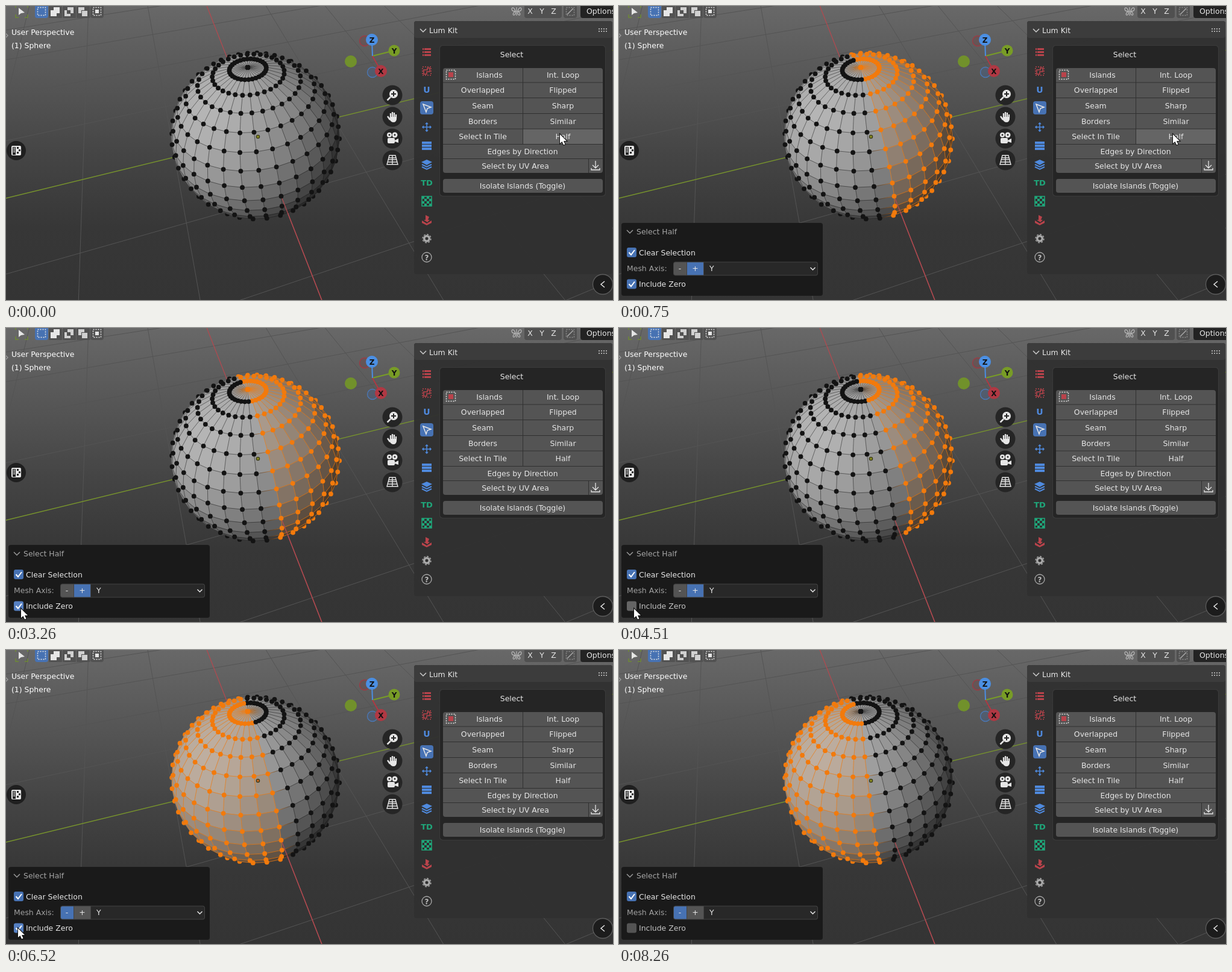
Recreate the animation shown at these times as an HTML page with a canvas. Size 1007x488 px, loop 8780 ms.

```html
<!DOCTYPE html>
<html lang="en">
<head>
<meta charset="utf-8">
<title>Select Half</title>
<style>
html, body { margin: 0; width: 100%; height: 100%; overflow: hidden; background: #3a3a3a; }
canvas { display: block; }
</style>
</head>
<body>
<canvas id="stage" width="1007" height="488"></canvas>
<script>
const g = document.getElementById('stage').getContext('2d');
const LOOP = 8780;
const WHITE = '#e6e6e6', BLUE = '#4772b3', GREY = '#545454', ORANGE = '#f27a0c';
const RED_ICON = '#b9434b', BLUE_ICON = '#4f8ade', GREEN_ICON = '#1fa67a';

// start time, cursor x, cursor y, side (0 = nothing selected yet), include zero
const steps = [
  [0, 919, 213, 0, 1], [500, 919, 213, 1, 1],
  [1000, 800, 262, 1, 1], [1250, 400, 390, 1, 1], [1500, 60, 464, 1, 1],
  [1750, 25, 466, 1, 1], [2000, 25, 466, 1, 0], [3260, 25, 466, 1, 1],
  [4010, 25, 466, 1, 0], [4760, 62, 450, 1, 0],
  [5010, 92, 439, -1, 0], [6020, 54, 452, -1, 0], [6270, 20, 462, -1, 0],
  [6520, 20, 462, -1, 1], [7270, 20, 462, -1, 0],
  [7770, 420, 360, -1, 0], [8010, 960, 300, -1, 0], [8260, -99, 0, -1, 0]
];

// ---- drawing helpers ----
function box(x, y, w, h, color, r = 0) {
  g.fillStyle = color;
  g.beginPath();
  g.roundRect(x, y, w, h, r);
  g.fill();
}
function disc(x, y, r, color, ring) {
  g.beginPath();
  g.arc(x, y, r, 0, 7);
  if (color) { g.fillStyle = color; g.fill(); }
  if (ring) { g.strokeStyle = ring; g.lineWidth = 1.3; g.stroke(); }
}
function text(s, x, y, color = WHITE, align = 'left', size = 12.45, weight = '') {
  g.font = `${weight} ${size}px "DejaVu Sans", sans-serif`;
  g.textAlign = align;
  g.fillStyle = color;
  g.fillText(s, x, y);
}
function shape(x, y, d, fill, stroke, w = 1.5) {
  const p = new Path2D(d);
  g.save();
  g.translate(x, y);
  if (stroke) { g.strokeStyle = stroke; g.lineWidth = w; g.stroke(p); }
  if (fill) { g.fillStyle = fill; g.fill(p); }
  g.restore();
}
function line(a, b, color, w = 1) {
  g.strokeStyle = color;
  g.lineWidth = w;
  g.beginPath();
  g.moveTo(a.x, a.y);
  g.lineTo(b.x, b.y);
  g.stroke();
}
function dashed(x, y, size, color) {
  g.setLineDash([2, 2]);
  g.strokeStyle = color;
  g.lineWidth = 1.5;
  g.strokeRect(x - size / 2, y - size / 2, size, size);
  g.setLineDash([]);
}

// ---- perspective camera ----
const FOCAL = 700, DEPTH = 5.18, OX = -0.792, OY = -0.244;
const RAD = Math.PI / 180, PITCH = 45.5 * RAD, TURN = 20.45 * RAD;
const PS = Math.sin(PITCH), PC = Math.cos(PITCH), TS = Math.sin(TURN), TC = Math.cos(TURN);

function project(x, y, z) {
  const right = x * TS + y * TC, near = x * TC - y * TS;
  const down = PS * near - PC * z, front = PC * near + PS * z;
  const k = FOCAL / (DEPTH - front);
  return {
    x: 525 + k * (OX + right), y: 250 + k * (OY + down),
    right, down, front, side: y,
    facing: DEPTH * front - OX * right - OY * down - 1
  };
}

const SEGS = 32, RINGS = 16;
const verts = [];
for (let j = 0; j <= RINGS; j++) {
  const t = j * Math.PI / RINGS, row = [];
  for (let i = 0; i < SEGS; i++) {
    const a = i * 2 * Math.PI / SEGS;
    row.push(project(Math.sin(t) * Math.cos(a), Math.sin(t) * Math.sin(a), Math.cos(t)));
  }
  verts.push(row);
}
const vert = (j, i) => verts[j][i % SEGS];

function drawFloor() {
  const bg = g.createLinearGradient(0, 0, 0, 488);
  bg.addColorStop(0, '#686868');
  bg.addColorStop(0.5, '#454545');
  bg.addColorStop(0.75, '#373737');
  bg.addColorStop(1, '#343434');
  g.fillStyle = bg;
  g.fillRect(0, 0, 1007, 488);
  for (let k = -4; k <= 3; k++) {
    if (!k) continue;
    line(project(k, -6, 0), project(k, 20, 0), '#545454');
    line(project(-20, k, 0), project(4, k, 0), '#545454');
  }
  line(project(-20, 0, 0), project(4, 0, 0), '#b04a50', 1.3);
  line(project(0, -6, 0), project(0, 20, 0), '#78952c', 1.3);
}

function drawSphere(sign, zero) {
  const picked = v => {
    const s = sign * v.side;
    return sign !== 0 && (Math.abs(v.side) < 1e-6 ? zero : s > 0);
  };
  const point = v => disc(v.x, v.y, 3.9, picked(v) ? ORANGE : '#131313');
  const all = verts.flat();
  all.filter(v => v.facing <= 0 && v.facing > -0.7).forEach(point);

  for (let j = 0; j < RINGS; j++) for (let i = 0; i < SEGS; i++) {
    const q = [vert(j, i), vert(j, i + 1), vert(j + 1, i + 1), vert(j + 1, i)];
    const mean = key => q.reduce((sum, v) => sum + v[key], 0) / 4;
    if (mean('facing') < -0.1) continue;
    const light = -0.42 * mean('right') - 0.25 * mean('down') + 0.87 * mean('front');
    const v = 42 + 140 * Math.max(0, (light + 0.3) / 1.3) ** 1.15;
    const mix = q.every(picked) ? 0.13 : 0;
    const rgb = [250, 130, 20].map(c => v + (c - v) * mix);
    g.fillStyle = g.strokeStyle = `rgb(${rgb})`;
    g.lineWidth = 0.7;
    g.beginPath();
    q.forEach(p => g.lineTo(p.x, p.y));
    g.closePath();
    g.fill();
    g.stroke();
  }

  const tint = v => picked(v) ? 'rgba(242,125,16,.8)' : 'rgba(25,25,25,.55)';
  const edge = (a, b) => {
    if (a.facing < -0.2 || b.facing < -0.2) return;
    let color = tint(a);
    if (picked(a) !== picked(b)) {
      color = g.createLinearGradient(a.x, a.y, b.x, b.y);
      color.addColorStop(0, tint(a));
      color.addColorStop(1, tint(b));
    }
    line(a, b, color, 0.9);
  };
  for (let j = 0; j < RINGS; j++) for (let i = 0; i < SEGS; i++) {
    edge(vert(j, i), vert(j + 1, i));
    if (j) edge(vert(j, i), vert(j, i + 1));
  }
  line(project(1, 0, 0), project(4, 0, 0), '#b04a50', 1.3);
  all.filter(v => v.facing > 0).forEach(point);
  disc(418, 217, 2.6, sign < 0 && zero ? '#c8671e' : '#8a8c22', '#3a3a1a');
}

// ---- interface ----
function drawHeader() {
  shape(0, 0, 'M16 3V0M16 14V19H21M31 19H36V14M36 3V0', null, '#6f8a35');
  shape(21, 3, 'M0 0V12L4 9 10 8Z', WHITE);
  for (let i = 0; i < 5; i++) {
    const x = 48 + i * 23;
    box(x, -5, 22, 25, i ? '#525252' : BLUE, i === 0 || i === 4 ? 4 : 1);
    if (i === 0 || i === 4) dashed(x + 11, 9, 13, WHITE);
  }
  shape(74, 2, 'M5 0H15V10H10V15H0V5H5Z', WHITE);
  shape(97, 2, 'M5 0H15V10H10V5H5ZM0 5H4V11H10V15H0Z', '#d0d0d0');
  shape(120, 2, 'M0 0H10V5H5V10H0ZM6 6H15V15H6Z', '#d0d0d0');
  box(148, 6, 6, 6, WHITE);
  shape(847, 9, 'M0 -7V7M-2 0C-4 -8 -8 -7 -8 -4S-5 0 -2 0C-6 1 -7 7 -4 6S-2 2 -2 0M2 0C4 -8 8 -7 8 -4S5 0 2 0C6 1 7 7 4 6S2 2 2 0', null, '#b8b8b8', 1.2);
  box(860, -5, 62, 25, '#505050', 4);
  ['X', 'Y', 'Z'].forEach((s, i) => text(s, 869.5 + i * 19.5, 13, WHITE, 'center'));
  box(925, -5, 22, 25, '#505050', 4);
  dashed(936, 9, 13, '#8c8c8c');
  shape(931, 4, 'M0 10L10 0', null, '#aaa');
  box(953, -5, 70, 25, '#232323', 4);
  text('Options', 963, 13);
  text('User Perspective', 9, 48, '#fff');
  text('(1) Sphere', 9, 70, '#fff');
  shape(0, 49, 'M-1 -4L3 0-1 4', null, '#999');
}

function drawGizmo() {
  const o = { x: 608, y: 83 };
  disc(595, 58, 8.5, 'rgba(120,50,55,.25)', '#9e3a44');
  disc(608, 110, 8.5, 'rgba(70,100,150,.35)', '#4b79b8');
  disc(572, 92, 10, '#71912b');
  const ends = [['Y', 644, 74, '#789c26', 9.5], ['Z', 607, 56, '#4b8fe3', 10], ['X', 622, 108, '#b03843', 10]];
  for (const [name, x, y, color, r] of ends) {
    line(o, { x, y }, color, 2);
    disc(x, y, r, color);
    text(name, x, y + 4.5, '#111', 'center', 12, 'bold');
  }
  for (let i = 0; i < 4; i++) disc(641, 148 + i * 36, 16.5, '#252525');
  shape(638, 151, 'M0 0L-5.5 5.5', null, WHITE, 2.5);
  disc(643, 146, 7, WHITE);
  shape(643, 146, 'M-4 0H4M0 -4V4', null, '#252525', 2);
  shape(641, 184, 'M-3 1V-6M0 0V-8M3 1V-7M6 2V-4M-8 -1L-4 5', null, WHITE, 2.3);
  shape(641, 184, 'M-4 0H7V4Q6 9 2 9Q-3 9 -5 3Z', WHITE);
  disc(636, 214, 4, WHITE);
  disc(645, 214, 4.5, WHITE);
  disc(636, 214, 1.4, '#252525');
  disc(645, 214, 1.4, '#252525');
  box(633, 219, 12, 9, WHITE, 2);
  shape(645, 220, 'M0 3L6 0V7L0 5Z', WHITE);
  shape(641, 256, 'M-5 -8H5L9 7H-9ZM0 -8V7M-7 -1H7M-8 3H8M-6 -4H6', null, WHITE, 1.4);
  disc(17, 240, 16, '#1f1f1f');
  box(9, 232, 16, 16, WHITE, 2);
  shape(10, 233, 'M1 1H6V14H1ZM8 1H11V4H8ZM11 5H14V8H11ZM8 9H11V12H8Z', '#222');
  shape(11, 234, 'M1 2H4M1 5H4M1 8H4', null, WHITE);
}

function drawTabs() {
  const x = 698;
  for (let i = 0; i < 3; i++) {
    box(x - 7, 70 + i * 5, 2, 3, RED_ICON);
    box(x - 4, 70 + i * 5, 11, 3, RED_ICON);
    box(x - 8, 225 + i * 5, 16, 4, BLUE_ICON);
  }
  dashed(x, 108, 14, RED_ICON);
  shape(x, 108, 'M-5 5V-2H1V-5H5V1H0V5Z', null, RED_ICON);
  text('U', x, 144, BLUE_ICON, 'center', 14, 'bold');
  box(687, 158, 22, 22, BLUE, 4);
  shape(x, 169, 'M-6 -6L7 -1 1 1 -1 7Z', null, WHITE);
  shape(x, 201, 'M-7 0H7M0 -7V7M-5 -2L-7 0-5 2M5 -2L7 0 5 2M-2 -5L0 -7 2 -5M-2 5L0 7 2 5', null, BLUE_ICON);
  shape(x, 263, 'M0 -8L9 -4 0 1-9 -4Z', BLUE_ICON);
  shape(x, 263, 'M-8 0L0 4 8 0M-8 4L0 8 8 4', null, BLUE_ICON, 2);
  text('TD', x, 298, GREEN_ICON, 'center', 13, 'bold');
  g.strokeStyle = GREEN_ICON;
  g.lineWidth = 1.5;
  g.strokeRect(690, 316, 16, 16);
  for (let i = 0; i < 16; i++)
    if ((i + (i >> 2)) % 2 === 0) box(690 + i % 4 * 4, 316 + (i >> 2) * 4, 4, 4, GREEN_ICON);
  shape(x, 355, 'M-2 -8L4 -5 2 0H5L1 4-5 0H-2ZM-8 1L0 6 8 1V5L0 9-8 5Z', RED_ICON);
  g.setLineDash([3, 2.5]);
  disc(x, 386, 7, null, '#aaa');
  g.setLineDash([]);
  disc(x, 386, 6, '#aaa');
  disc(x, 386, 2.5, '#303030');
  disc(x, 417, 8, null, '#aaa');
  text('?', x, 421.5, '#bbb', 'center', 12, 'bold');
}

function drawSidePanel(hoverHalf) {
  box(677, 25, 329, 420, 'rgba(48,48,48,.95)', 4);
  box(677, 25, 329, 28, '#3c3c3c', 4);
  shape(692, 40, 'M-5 -2L0 3 5 -2', null, '#ccc');
  text('Lum Kit', 702, 45, WHITE);
  for (let i = 0; i < 8; i++) box(983 + i % 4 * 4, i < 4 ? 37 : 41, 2, 2, '#aaa');
  drawTabs();
  box(719, 65, 276, 251, '#3a3a3a', 5);
  box(720, 66, 274, 249, '#252525', 5);
  text('Select', 839, 85, WHITE, 'center');

  box(725, 103, 265, 174, GREY, 4);
  if (hoverHalf) box(858, 204, 132, 25, '#656565');
  [126.5, 152, 178, 203.5, 229, 253].forEach(y => box(725, y, 265, 1, '#303030'));
  box(857, 103, 1, 126, '#303030');
  box(966, 253, 1, 24, '#303030');
  box(725, 287, 265, 23, GREY, 4);
  const rows = [['Islands', 'Int. Loop', 119], ['Overlapped', 'Flipped', 144], ['Seam', 'Sharp', 170],
    ['Borders', 'Similar', 196], ['Select In Tile', 'Half', 221]];
  rows.forEach(([a, b, y], i) => {
    text(a, i ? 791 : 802, y, WHITE, 'center');
    text(b, 924, y, WHITE, 'center');
  });
  text('Edges by Direction', 857, 246, WHITE, 'center');
  text('Select by UV Area', 845, 270, WHITE, 'center');
  text('Isolate Islands (Toggle)', 857, 303, WHITE, 'center');
  dashed(738, 114, 15, WHITE);
  box(734, 110, 8, 8, RED_ICON);
  shape(978, 265, 'M0 -8V4M-5 -1L0 4 5 -1M-7 4V7H7V4', null, WHITE, 1.3);
  disc(990, 462, 16.5, '#1c1c1c', '#5c5c5c');
  shape(990, 462, 'M3 -5L-3 0 3 5', null, WHITE, 1.5);
}

function checkbox(y, on, hover, label) {
  box(13, y, 16, 16, on ? (hover ? '#5680c2' : BLUE) : (hover ? '#656565' : GREY), 3);
  if (on) shape(13, y, 'M3.5 8L7 12 13 4', null, '#fff', 2);
  text(label, 33, y + 12.5, on ? WHITE : '#c4c4c4');
}

function drawOperator(sign, zero, x, y) {
  box(4, 360, 334, 121, '#1a1a1a', 4);
  shape(18, 374, 'M-5 -2L0 3 5 -2', null, '#999');
  text('Select Half', 29, 379, '#a6a6a6');
  checkbox(401, true, false, 'Clear Selection');
  text('Mesh Axis:', 13, 440, '#a0a0a0');
  box(90, 424.5, 240, 23, '#424242', 4);
  box(91, 425.5, 21, 21, sign < 0 ? BLUE : GREY, [3, 0, 0, 3]);
  box(113, 425.5, 27, 21, sign > 0 ? BLUE : GREY);
  box(141, 425.5, 188, 21, '#282828', [0, 3, 3, 0]);
  text('-', 101, 440, WHITE, 'center');
  text('+', 126.5, 440, WHITE, 'center');
  text('Y', 150, 440);
  shape(321.5, 436, 'M-4 -2L0 2 4 -2', null, WHITE);
  checkbox(453.5, zero, x > 12 && x < 30 && y > 453, 'Include Zero');
}

function draw([, x, y, sign, zero]) {
  drawFloor();
  drawSphere(sign, !!zero);
  drawHeader();
  drawGizmo();
  drawSidePanel(x > 858 && x < 990 && y > 203 && y < 229);
  if (sign) drawOperator(sign, !!zero, x, y);
  shape(x, y, 'M0 0V15L3.5 12 6 17.5 8.5 16.5 6 11H11Z', '#fff', '#111', 2);
}

let shown;
function tick(now) {
  const t = now % LOOP;
  const step = steps.findLast(s => s[0] <= t) || steps[0];
  if (step !== shown) draw(shown = step);
  requestAnimationFrame(tick);
}
tick(0);
</script>
</body>
</html>
```
